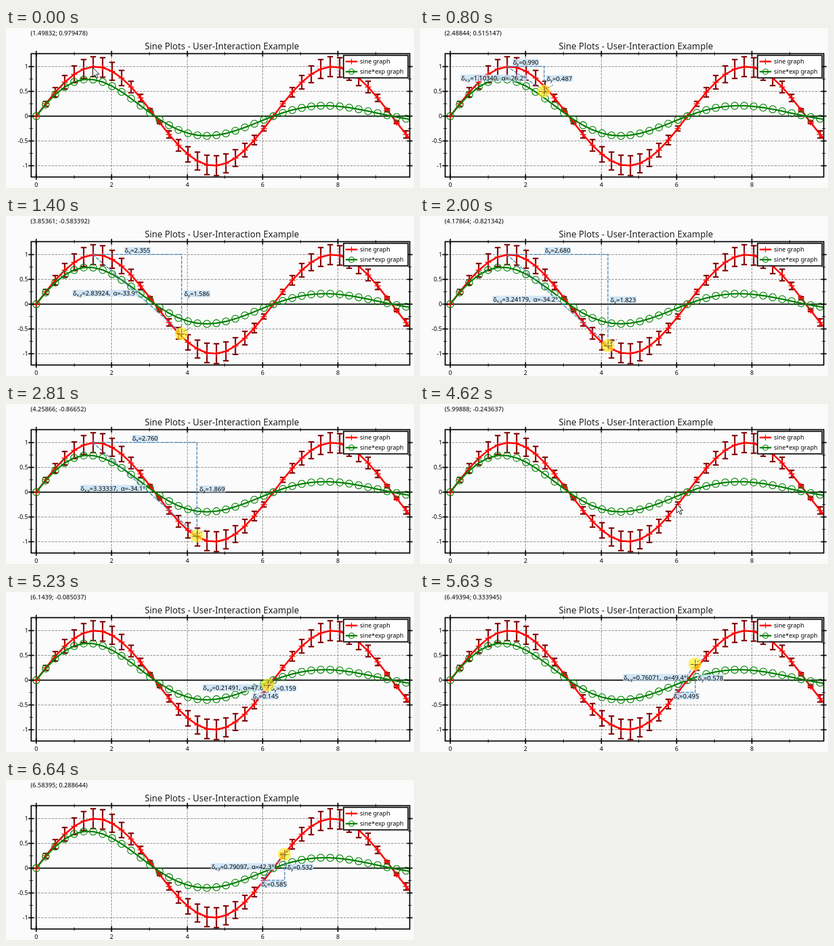
An HTML page that plays this animation: 721x284 px, repeating every 7250 ms.

```html
<!DOCTYPE html>
<html lang="en">
<head>
<meta charset="utf-8">
<title>Sine plots</title>
<style>
html, body { margin: 0; width: 100%; height: 100%; overflow: hidden; background: #fbfbfb; }
svg { display: block; font: 10.7px "Noto Sans", "Open Sans", sans-serif; }
.title { font-size: 15.72px; fill: #222; }
.readout { font-size: 11.05px; }
.grid { stroke: #808080; stroke-dasharray: 4 2; }
.axis { stroke: #000; stroke-width: 2; fill: none; }
.minor { stroke: #000; stroke-width: 1; }
.error { stroke: #800000; stroke-width: 2.5; fill: none; }
.sine { stroke: #f00; stroke-width: 3; fill: none; }
.plus { stroke: #f00; stroke-width: 1.5; fill: none; }
.damped { stroke: #008000; stroke-width: 2.6; fill: none; }
.ring { stroke: #008000; stroke-width: 1.3; fill: none; }
.ruler { stroke: #4682b4; stroke-width: 1.5; stroke-dasharray: 6 2; fill: none; }
.tag rect { fill: #cbe3f7; fill-opacity: .85; }
.tag text { font-size: 11.1px; word-spacing: 2px; }
.tag .sub { font-size: 7px; }
</style>
</head>
<body>
<svg id="stage" width="721" height="284" viewBox="0 0 721 284">
  <defs><clipPath id="area"><rect x="45" y="46" width="668" height="218"/></clipPath></defs>
  <text id="readout" class="readout" x="43.5" y="13"></text>
  <text class="title" x="381.5" y="38" text-anchor="middle">Sine Plots - User-Interaction Example</text>
  <g id="plot"></g>
  <g id="legend">
    <rect x="596.5" y="48.5" width="114" height="40" fill="#fff" stroke="#000" stroke-width="2"/>
    <path class="sine" d="M600 59.5H621"/>
    <path class="plus" d="M605.5 59.5h10m-5-5v10"/>
    <path class="damped" d="M600 77.5H621"/>
    <circle class="ring" cx="610.5" cy="77.5" r="4.8"/>
    <text x="625.5" y="63">sine graph</text>
    <text x="625.5" y="81">sine*exp graph</text>
  </g>
  <g id="measure">
    <path id="ruler" class="ruler"/>
    <g id="tags"></g>
    <g id="pen">
      <circle r="11.5" fill="#ffee28" fill-opacity=".7"/>
      <path d="M-8 .5H8M.5-8V8" stroke="#554a10" stroke-dasharray="6 1.5" fill="none"/>
      <path d="M4-4L18-12" stroke="#222" stroke-dasharray="2 2"/>
    </g>
  </g>
  <path id="arrow" d="M.5.5V16.5L4.3 13L7 19L9.5 18L6.8 12H11.8Z" fill="#fff" stroke="#000"/>
</svg>
<script>
const NS = 'http://www.w3.org/2000/svg';
const $ = id => document.getElementById(id);
const px = x => 53.5 + x * 66.67;
const py = y => 156.5 - y * 88;
const left = 44.5, right = 713.5, top_ = 45.5, bottom = 264.5;

function add(parent, name, attrs, text) {
  const el = document.createElementNS(NS, name);
  for (const k in attrs) el.setAttribute(k, attrs[k]);
  if (text !== undefined) el.textContent = text;
  return parent.appendChild(el);
}
const stroke = (parent, cls, d) => add(parent, 'path', { class: cls, d });

function drawPlot() {
  const plot = $('plot');
  const crisp = v => Math.floor(v) + .5;
  for (let x = 2; x <= 8; x += 2) stroke(plot, 'grid', `M${crisp(px(x))} ${bottom}V${top_}`);
  for (let y = -1; y <= 1; y += .5) stroke(plot, 'grid', `M${left} ${crisp(py(y))}H${right}`);
  stroke(plot, 'axis', `M${left} ${py(0)}H${right}M${px(0)} ${top_}V${bottom}`);

  const curves = add(plot, 'g', { 'clip-path': 'url(#area)' });
  const xs = Array.from({ length: 41 }, (_, i) => i * .08 * Math.PI);
  const damped = x => Math.sin(x) * Math.exp(-x / 5);
  const line = f => 'M' + xs.map(x => `${px(x)} ${py(f(x))}`).join('L');
  stroke(curves, 'error', xs.map(x => {
    const e = 17.6 * Math.abs(Math.sin(x)), y = py(Math.sin(x)), c = px(x);
    return `M${c - 5} ${y - e}h10m-5 0V${y + e}m-5 0h10`;
  }).join(''));
  stroke(curves, 'sine', line(Math.sin));
  stroke(curves, 'plus', xs.map(x => `M${px(x) - 5.5} ${py(Math.sin(x))}h11m-5.5-5.5v11`).join(''));
  stroke(curves, 'damped', line(damped));
  for (const x of xs) add(curves, 'circle', { class: 'ring', cx: px(x), cy: py(damped(x)), r: 6.3 });

  stroke(plot, 'axis', `M${left} ${top_}H${right}V${bottom}H${left}Z`);
  for (let x = 0; x <= 9; x++) {
    const c = crisp(px(x)), major = x % 2 === 0, r = major ? 5 : 3;
    stroke(plot, major ? 'axis' : 'minor', `M${c} ${top_ - r}v${2 * r}M${c} ${bottom - r}v${2 * r}`);
    if (major) add(plot, 'text', { x: c, y: 281.5, 'text-anchor': 'middle' }, x);
  }
  for (let i = -4; i <= 4; i++) {
    const c = py(i / 4), major = i % 2 === 0, r = major ? 5 : 3;
    stroke(plot, major ? 'axis' : 'minor', `M${left - r} ${c}h${2 * r}M${right - r} ${c}h${2 * r}`);
    if (major) add(plot, 'text', { x: 39, y: c + 3.5, 'text-anchor': 'end' }, i / 4);
  }
}

// time, x, y, anchor of the running measurement (none = plain pointer)
const A = [1.49832, 1.002132], B = [5.99888, -.243637];
const steps = [
  [0, 1.49832, .979478],
  [200, 1.5358, .984122, A], [400, 1.7308, .94231, A], [600, 2.08087, .807642, A],
  [800, 2.48844, .515147, A], [1000, 3.10352, .012641, A], [1200, 3.62858, -.422874, A],
  [1400, 3.85361, -.583392, A], [1600, 3.97362, -.674125, A], [1800, 4.08863, -.753218, A],
  [2000, 4.17864, -.821342, A], [2200, 4.24366, -.855193, A], [2810, 4.25866, -.86652, A],
  [3820, 4.25866, -.86652], [4020, 4.44367, -.855193], [4220, 4.99873, -.753218],
  [4420, 5.67385, -.447352], [4620, 5.99888, -.243637],
  [5030, 6.02889, -.209655, B], [5230, 6.14390, -.085037, B], [5430, 6.32892, .130183, B],
  [5630, 6.49394, .333945, B], [5830, 6.58395, .356604, B], [6030, 6.60895, .299971, B],
  [6440, 6.59895, .294303, B], [6640, 6.58395, .288644, B]
];

function tag(x, y, sub, text, align) {
  const g = add($('tags'), 'g', { class: 'tag' });
  const box = add(g, 'rect', { y: y - 6, height: 12 });
  const t = add(g, 'text', { y: y + 4 });
  add(t, 'tspan', {}, 'δ');
  add(t, 'tspan', { class: 'sub', dy: 2 }, sub);
  add(t, 'tspan', { dy: -2 }, text);
  const w = t.getComputedTextLength() + 2;
  const start = x - w * align;
  box.setAttribute('x', start);
  box.setAttribute('width', w);
  t.setAttribute('x', start + 1);
}

function show([, x, y, anchor]) {
  const cx = px(x), cy = py(y);
  $('readout').textContent = `(${+x.toPrecision(6)}; ${+y.toPrecision(6)})`;
  $('arrow').style.display = anchor ? 'none' : '';
  $('measure').style.display = anchor ? '' : 'none';
  $('arrow').setAttribute('transform', `translate(${Math.floor(cx)} ${Math.floor(cy)})`);
  if (!anchor) return;
  const ax = px(anchor[0]), ay = py(anchor[1]);
  const dx = x - anchor[0], dy = y - anchor[1];
  const mx = (ax + cx) / 2, my = (ay + cy) / 2;
  const angle = Math.atan2(dy, dx) * 180 / Math.PI;
  $('ruler').setAttribute('d', `M${ax} ${ay}H${cx}V${cy}M${ax} ${ay}L${cx} ${cy}`);
  $('pen').setAttribute('transform', `translate(${Math.round(cx)} ${Math.round(cy) + 1})`);
  $('tags').replaceChildren();
  tag(mx + .5, ay + (dy < 0 ? -7 : 7), 'x', '=' + Math.abs(dx).toFixed(3), .5);
  tag(cx + 3.5, my, 'y', '=' + Math.abs(dy).toFixed(3), 0);
  tag(mx + 2, my - 1, 'x,y', `=${Math.hypot(dx, dy).toFixed(5)}, α=${angle.toFixed(1)}°`, 1);
}

let shown;
function frame() {
  const t = performance.now() % 7250;
  const step = steps.findLast(s => s[0] <= t);
  if (step !== shown) show(shown = step);
  requestAnimationFrame(frame);
}
drawPlot();
frame();
</script>
</body>
</html>
```
